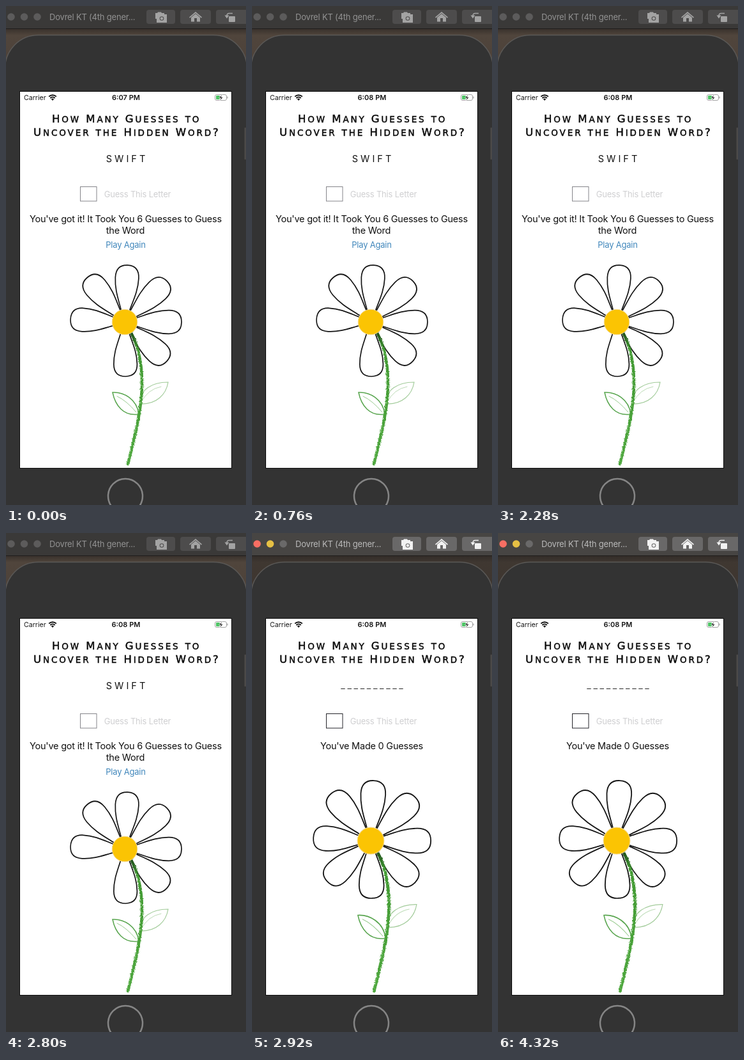
Animation of 376x780 px, one loop 4560 ms. Source, as an HTML page:

```html
<!DOCTYPE html>
<html lang="en">
<head>
<meta charset="utf-8">
<title>Hidden word</title>
<style>
html, body { margin: 0; width: 100%; height: 100%; overflow: hidden; background: #333; }
svg { display: block; width: 376px; height: 780px; font-family: Inter, Roboto, sans-serif; }
.bar { fill: #3a3938; }
.btn { fill: #4d4c4c; }
.icon { fill: #a3a3a3; stroke: none; }
.line { fill: none; stroke: #a3a3a3; }
.name { fill: #929292; font-size: 13px; letter-spacing: -.2px; }
.light { fill: #5c5b5b; }
.live .bar { fill: #474543; }
.live .btn { fill: #696868; }
.live .icon { fill: #f2f2f2; }
.live .line { stroke: #f2f2f2; }
.live .name { fill: #bababa; }
.live .red { fill: #f86e63; }
.live .yellow { fill: #e6c044; }
.live .grey { fill: #6a6969; }
.live .desk { opacity: .55; }
.head { font: 13.5px "DejaVu Sans", sans-serif; letter-spacing: 2.9px; white-space: pre; stroke: #0b0b0b; stroke-width: .5px; }
.head tspan { font-size: 16.5px; }
.body { font-size: 14.5px; letter-spacing: -.23px; text-anchor: middle; }
.small { font-size: 13px; letter-spacing: -.2px; text-anchor: middle; }
.box { fill: #fff; stroke: #85858a; }
.fresh .box { stroke: #25252a; }
.fresh .won, .playing { display: none; }
.fresh .playing { display: inline; }
.pressed #again { opacity: .2; }
</style>
</head>
<body>
<svg id="stage" viewBox="0 0 376 780">
  <defs>
    <linearGradient id="wood" x1="0" y1="0" x2="0" y2="1">
      <stop offset="0" stop-color="#37302b"/>
      <stop offset=".12" stop-color="#50453c"/>
      <stop offset="1" stop-color="#4a3f37"/>
    </linearGradient>
    <linearGradient id="stalk" gradientUnits="userSpaceOnUse" x1="0" y1="510" x2="0" y2="717">
      <stop offset="0" stop-color="#1f4f1b"/>
      <stop offset=".13" stop-color="#429a33"/>
      <stop offset="1" stop-color="#50a840"/>
    </linearGradient>
    <filter id="rough" filterUnits="userSpaceOnUse" x="150" y="490" width="120" height="240" color-interpolation-filters="sRGB">
      <feTurbulence type="fractalNoise" baseFrequency=".45" numOctaves="2" seed="4"/>
      <feDisplacementMap in="SourceGraphic" scale="4" xChannelSelector="R" yChannelSelector="G"/>
    </filter>
    <path id="stem" d="M196 511C208 533 213 560 213 590C213 634 200 678 191 716"/>
  </defs>

  <!-- window and device -->
  <rect width="376" height="780" fill="#2b2724"/>
  <rect class="desk" y="35" width="376" height="90" fill="url(#wood)"/>
  <rect x="-1.5" y="45.5" width="379" height="800" rx="52" fill="#333" stroke="#5a5856" stroke-width="1.5"/>
  <rect x="373.5" y="190" width="2.5" height="50" rx="1" fill="#4c4a49"/>
  <rect class="bar" width="376" height="35"/>
  <rect y="35" width="376" height="1" fill="#1f1d1c"/>
  <circle class="light red" cx="8" cy="17" r="5.8"/>
  <circle class="light yellow" cx="28.5" cy="17" r="5.8"/>
  <circle class="light grey" cx="49" cy="17" r="5.8"/>
  <text class="name" x="68" y="22">Dovrel KT (4th gener...</text>
  <rect class="btn" x="220" y="6" width="45" height="22" rx="4"/>
  <rect class="btn" x="273" y="6" width="48" height="22" rx="4"/>
  <rect class="btn" x="329" y="6" width="52" height="22" rx="4"/>
  <path class="icon" d="M234 11h3l1-1.500h5l1 1.500h4v9h-14z"/>
  <path class="icon btn" d="M236 13h16v13h-16z"/>
  <path class="icon" d="M237 15h3.500l1.500-2h4l1.500 2H251v10h-14z"/>
  <circle class="btn" cx="244" cy="19.500" r="3.300"/>
  <circle class="icon" cx="244" cy="19.500" r="2.300"/>
  <path class="icon" d="M297 9l10 8.500-1 1.200-9-7.500-9 7.500-1-1.200zM290 18l7-5.700 7 5.700v6.500h-5V19h-4v5.500h-5z"/>
  <rect class="icon" x="349" y="16" width="10" height="9" rx="1"/>
  <path class="line" stroke-width="1.500" d="M355 11.500h-5.500q-3.500 0-3.500 4"/>
  <path class="icon" d="M342.500 14.500h7l-3.500 5z"/>

  <circle cx="187" cy="766" r="27" fill="#333" stroke="#858585" stroke-width="2.500"/>
  <rect x="21" y="133" width="333" height="590" fill="#0d0d0d"/>
  <rect x="22" y="134" width="331" height="588" fill="#fff"/>

  <!-- status bar -->
  <g fill="#151515">
    <text x="28" y="147" font-size="10.600">Carrier</text>
    <text id="clock" x="188" y="147" font-size="11" font-weight="600" text-anchor="middle">6:07 PM</text>
    <g fill="none" stroke="#111" stroke-width="1.900">
      <path d="M67.200 141.600a8.300 8.300 0 0 1 11.600 0M69.300 144a5.300 5.300 0 0 1 7.400 0"/>
    </g>
    <path d="M73 148l-2.200-2.400a3.200 3.200 0 0 1 4.400 0z"/>
  </g>
  <rect x="327.500" y="138.500" width="18" height="9" rx="2.500" fill="#fff" stroke="#a5a5a5"/>
  <rect x="329" y="140" width="6" height="6" rx="1" fill="#4fc466"/>
  <path d="M347 141.500v3" stroke="#a5a5a5" stroke-width="1.300"/>
  <path d="M338.500 138.500l-5 5.300h3l-1.500 4.200 5-5.500h-3z" fill="#111" stroke="#fff" stroke-width=".6"/>

  <!-- game -->
  <g class="head" fill="#0b0b0b">
    <text x="72" y="182"><tspan>H</tspan>OW<tspan> M</tspan>ANY<tspan> G</tspan>UESSES<tspan> </tspan>TO</text>
    <text x="43" y="203"><tspan>U</tspan>NCOVER<tspan> </tspan>THE<tspan> H</tspan>IDDEN<tspan> W</tspan>ORD<tspan>?</tspan></text>
  </g>
  <rect class="box" x="116.500" y="282.500" width="25.500" height="22.500"/>
  <text class="small" x="206" y="298.500" fill="#cfcfd1">Guess This Letter</text>
  <g class="won" fill="#111">
    <text x="187.500" y="243.500" font-size="14.500" text-anchor="middle">S W I F T</text>
    <text class="body" x="187.500" y="337.500">You've got it! It Took You 6 Guesses to Guess</text>
    <text class="body" x="187" y="355.500">the Word</text>
    <text class="small" id="again" x="187.500" y="377.500" fill="#3f86bb">Play Again</text>
  </g>
  <g class="playing" fill="#111">
    <text class="body" x="188" y="243.300" font-weight="300">_ _ _ _ _ _ _ _ _ _</text>
    <text class="body" x="187.500" y="337.500">You've Made 0 Guesses</text>
  </g>

  <g id="flower">
    <g id="petals" fill="none" stroke="#151515" stroke-width="1.700"></g>
    <g fill="none" stroke-linecap="round">
      <g stroke="#58a54e" stroke-width="1.500">
        <path d="M167 604C184 603 205 614 208 638C184 642 171 624 167 604Z"/>
        <path d="M174 610Q189 617 204 635" stroke="#9bcd92" stroke-width="1"/>
      </g>
      <g stroke="#a3cc9b" stroke-width="1.200">
        <path d="M210 622C209 600 228 588 254 588C251 607 236 623 210 622Z"/>
        <path d="M212 619Q222 599 243 595" stroke="#bddcb7" stroke-width="1"/>
      </g>
      <g filter="url(#rough)">
        <use href="#stem" stroke="url(#stalk)" stroke-width="4.600"/>
        <use href="#stem" stroke="#9bd68e" stroke-width="1.200" stroke-dasharray="0 24 1 4 2 3 1 6" transform="translate(-1.200 0)"/>
      </g>
    </g>
    <circle cx="186" cy="494" r="19.800" fill="#fbc403" stroke="#f4dc98" stroke-width="1"/>
  </g>
</svg>
<script>
const LOOP = 4560, MINUTE = 280, PRESS = 2840, RESET = 2920;
const $ = id => document.getElementById(id);
const stage = $("stage"), clock = $("clock"), flower = $("flower");

// angle clockwise from up, length
const petals = [[3, 89], [46, 92], [90, 89], [133, 90], [179, 85], [227, 88], [273, 85], [320, 91]];
const outline = "M-6.500-18C-11-33-18.300-49-18.300-69C-18.300-83-11-89 0-89" +
  "C11-89 18.300-83 18.300-69C18.300-49 11-33 6.500-18";

for (const [angle, length] of petals) {
  const petal = document.createElementNS(stage.namespaceURI, "path");
  petal.setAttribute("d", outline);
  petal.setAttribute("transform", `translate(186 494) rotate(${angle}) scale(1 ${length / 89})`);
  if (angle === 227) petal.setAttribute("class", "playing");
  $("petals").append(petal);
}

function draw(t) {
  const fresh = t >= RESET;
  stage.classList.toggle("live", t >= PRESS);
  stage.classList.toggle("pressed", t >= PRESS && !fresh);
  stage.classList.toggle("fresh", fresh);
  clock.textContent = t < MINUTE ? "6:07 PM" : "6:08 PM";
  const size = fresh ? 1.058 : 1;
  flower.setAttribute("transform", `translate(186 717) scale(${size}) translate(-186 -717)`);
}

const start = performance.now();
function tick() {
  draw((performance.now() - start) % LOOP);
  requestAnimationFrame(tick);
}
tick();
</script>
</body>
</html>
```
